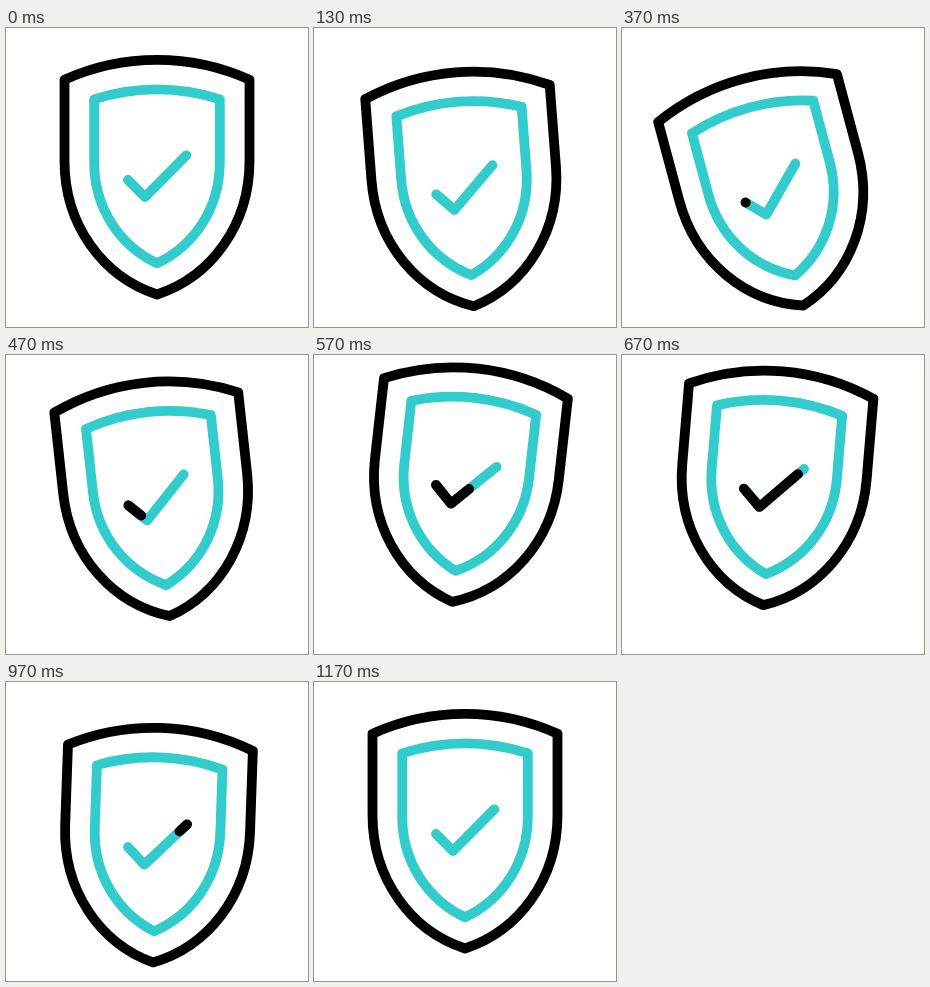
An HTML page that plays this animation: 302x299 px, repeating every 1670 ms.

```html
<!DOCTYPE html>
<html lang="en">
<head>
<meta charset="utf-8">
<title>Shield</title>
<style>
  html, body { margin: 0; height: 100%; overflow: hidden; background: #fff; }
  svg { display: block; width: 100vw; height: 100vh; }
  path { fill: none; stroke: #3cc; stroke-width: 9.8; stroke-linecap: round; stroke-linejoin: round; }
  .dark { stroke: #000; }
</style>
</head>
<body>
<svg viewBox="0 0 302 299">
  <g id="sparks">
    <path pathLength="1" d="M41 64L13 71"/>
    <path pathLength="1" d="M44 47L21 35"/>
    <path pathLength="1" d="M53.500 32.500L42.500 11"/>
  </g>
  <g id="shield">
    <path class="dark" d="M58.500 51.700A226 226 0 0 1 243.500 51.700V133C243.500 197 205 249 151 266.500C97 249 58.500 197 58.500 133Z"/>
    <path d="M88.200 71.300A203 203 0 0 1 213.800 71.300V134.500C213.800 179.500 188.700 217.500 151 235.300C113.300 217.500 88.200 179.500 88.200 134.500Z"/>
    <path d="M122 152L139 169L180.300 127.300"/>
    <path id="sweep" class="dark" pathLength="1" d="M122 152L139 169L180.300 127.300"/>
  </g>
</svg>
<script>
const LOOP = 1670, STEP = 1000 / 30, LAST = 35;

// Keys are [step, value] pairs
const drop = [[0, 0], [8, 24.1], [18, -20], [27.2, 16], [35, 0]];
const tilt = [[0, 0], [11, -15], [18, 7.5], [24, -3.3], [29, 2], [33, 0]];
const sweepHead = [[10.5, 0], [22.4, 1]];
const sweepTail = [[20.7, 0], [31.5, 1]];
const sparkHead = [[20.7, 0], [25.9, 1]];
const sparkTail = [[22, 0], [27.6, 1]];

const shield = document.getElementById('shield');
const sweep = document.getElementById('sweep');
const sparks = document.querySelectorAll('#sparks path');

function valueAt(keys, step) {
  if (step <= keys[0][0]) return keys[0][1];
  const i = keys.findIndex(key => key[0] > step);
  if (i < 0) return keys[keys.length - 1][1];
  const [t0, v0] = keys[i - 1], [t1, v1] = keys[i];
  const ease = (1 - Math.cos(Math.PI * (step - t0) / (t1 - t0))) / 2;
  return v0 + (v1 - v0) * ease;
}

function trim(path, tail, head) {
  path.style.display = head > tail ? '' : 'none';
  path.setAttribute('stroke-dasharray', `${head - tail} 2`);
  path.setAttribute('stroke-dashoffset', -tail);
}

function draw(now) {
  const step = Math.min(LAST, Math.floor((now % LOOP + 4) / STEP));
  shield.setAttribute('transform',
    `translate(0 ${valueAt(drop, step)}) rotate(${valueAt(tilt, step)} 151 150)`);
  trim(sweep, valueAt(sweepTail, step), valueAt(sweepHead, step));
  for (const spark of sparks) trim(spark, valueAt(sparkTail, step), valueAt(sparkHead, step));
}

const start = performance.now();
function tick() {
  draw(performance.now() - start);
  requestAnimationFrame(tick);
}
tick();
</script>
</body>
</html>
```
